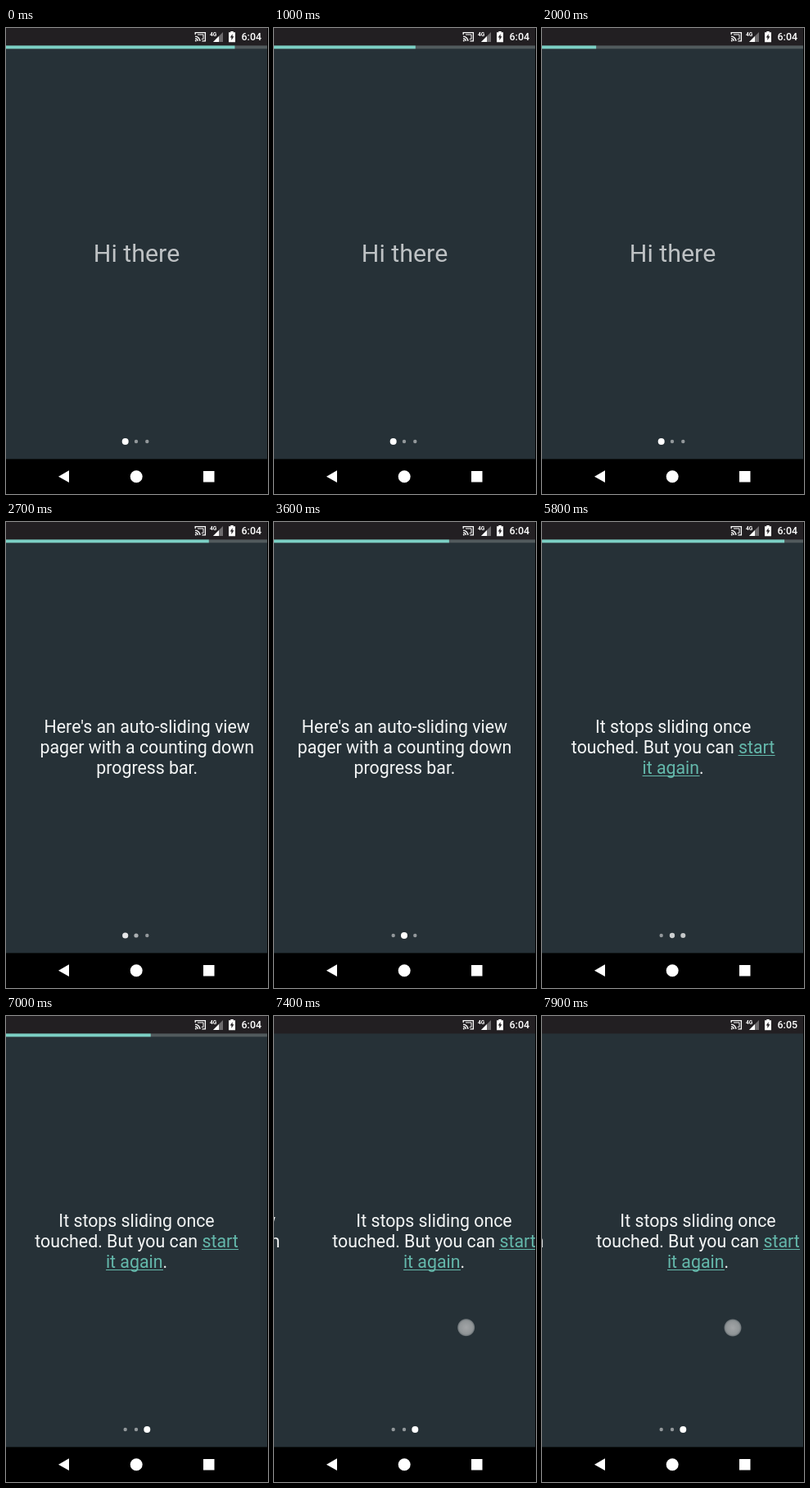
An HTML page for the animation above (8000 ms loop, 320 by 568 pixels).

```html
<!DOCTYPE html>
<html lang="en">
<head>
<meta charset="utf-8">
<title>Auto-sliding pager</title>
<style>
  html, body { margin: 0; width: 100%; height: 100%; overflow: hidden; background: #000; }
  svg { display: block; width: 320px; height: 568px; font-family: Roboto, sans-serif; }
  #pages text { text-anchor: middle; font-size: 21.33px; fill: #f4f6f6; }
  #pages .hello { font-size: 30.4px; fill: #bec2c4; }
  #pages .link { fill: #64b8ab; }
  .underline { stroke: #64b8ab; stroke-width: 1; }
</style>
</head>
<body>
<svg viewBox="0 0 320 568">
  <defs>
    <clipPath id="screen"><rect width="319" height="568"/></clipPath>
    <radialGradient id="tap">
      <stop offset="0" stop-color="#a2a5a7"/>
      <stop offset=".75" stop-color="#8f9496"/>
      <stop offset=".9" stop-color="#868c8f" stop-opacity=".8"/>
      <stop offset="1" stop-color="#7b8285" stop-opacity="0"/>
    </radialGradient>
  </defs>
  <g clip-path="url(#screen)">
    <rect width="319" height="568" fill="#263137"/>

    <g id="pages">
      <text class="hello" x="159.5" y="284.8">Hi there</text>
      <g transform="translate(319)">
        <text x="159.5" y="256.8">Here's an auto-sliding view</text>
        <text x="159.5" y="281.8">pager with a counting down</text>
        <text x="159.5" y="306.8">progress bar.</text>
      </g>
      <g transform="translate(638)">
        <text x="159.5" y="256.8">It stops sliding once</text>
        <text x="159.5" y="281.8">touched. But you can <tspan class="link">start</tspan></text>
        <text x="159.5" y="306.8"><tspan class="link">it again</tspan>.</text>
        <path class="underline" d="M239 284.5h45M122 309.5h70"/>
      </g>
    </g>

    <g id="dots" fill="#fff">
      <circle cx="145.7" cy="504"/>
      <circle cx="159" cy="504"/>
      <circle cx="172.3" cy="504"/>
    </g>

    <g id="bar">
      <rect y="21" width="319" height="4.3" fill="#515a5d"/>
      <rect id="left" y="21" height="4.3" fill="#7bcfc4"/>
    </g>
    <circle id="finger" r="11" fill="url(#tap)"/>

    <rect width="319" height="21.4" fill="#221f22"/>
    <g fill="none" stroke="#fff" stroke-width="1.3">
      <path d="M231.2 8V5.7h12.2v10.2h-4M231 10.2a5.9 5.9 0 0 1 5.9 5.9M231 12.8a3.3 3.3 0 0 1 3.3 3.3"/>
      <path d="M234 8h7v5.5h-2.2" stroke-width="1"/>
    </g>
    <circle cx="231.8" cy="15.4" r="1" fill="#fff"/>
    <text x="249" y="9.8" font-size="6.6" font-weight="700" fill="#fff">4G</text>
    <path d="M265 5v12h-12z" fill="#6d6b6d"/>
    <path d="M260 10v7h-7z" fill="#fff"/>
    <path d="M274.3 4h3.4v1.3h2.3v11.9h-8V5.300h2.300z" fill="#fff"/>
    <path d="M276.600 7.300v3h1.700l-2.900 4.700v-3.500h-1.600z" fill="#221f22"/>
    <text id="clock" x="312" y="15.4" font-size="12.400" font-weight="500" text-anchor="end" fill="#fff">6:04</text>

    <rect y="525.4" width="319" height="43"/>
    <g fill="#fff">
      <path d="M64 546.700l13-7.400v14.800z"/>
      <circle cx="159.200" cy="546.700" r="7.500"/>
      <rect x="241" y="540" width="13.500" height="13.500"/>
    </g>
  </g>
</svg>
<script>
  const $ = id => document.getElementById(id);
  const LOOP = 8000, STEP = 100, WIDTH = 319, COUNTDOWN = 3000;
  const TOUCH = 7150, MINUTE = 7800;
  const starts = [-380, 2605, 5657];   // when each page begins its countdown

  const clamp = v => Math.min(1, Math.max(0, v));
  const progress = (t, start, length) => clamp((t - start) / length);
  const decelerate = (u, power) => 1 - (1 - u) ** power;
  const easeInOut = u => (1 - Math.cos(Math.PI * u)) / 2;

  // Linear interpolation through [time, value] points.
  function follow(t, points) {
    let [t0, v0] = points[0];
    for (const [t1, v1] of points) {
      if (t < t1) return t1 === t0 ? v0 : v0 + (v1 - v0) * progress(t, t0, t1 - t0);
      [t0, v0] = [t1, v1];
    }
    return v0;
  }

  function drawPages(t) {
    const position = [1, 2].reduce((sum, i) => sum + decelerate(progress(t, starts[i], 200), 5), 0);
    const drag = follow(t, [[7220, 0], [7500, 56], [7700, 56], [7900, 31]]);
    $('pages').setAttribute('transform', `translate(${drag - position * WIDTH})`);
  }

  function drawDots(t) {
    const shown = i => i < starts.length ? easeInOut(progress(t, starts[i], 300)) : 0;
    [...$('dots').children].forEach((dot, i) => {
      const active = shown(i) - shown(i + 1);
      dot.setAttribute('r', 2.2 + 1.8 * active);
      dot.setAttribute('opacity', 0.5 + 0.5 * active);
    });
  }

  function drawBar(t) {
    const start = starts.filter(s => s <= t).pop();
    const refill = decelerate(progress(t, start, 172), 2);
    $('left').setAttribute('width', 320 * (1 - progress(t, start, COUNTDOWN)) * refill);
    $('bar').style.display = t < TOUCH ? '' : 'none';
  }

  function drawFinger(t) {
    const x = follow(t, [[7200, 188], [7500, 258], [7700, 258], [7900, 233]]);
    const y = follow(t, [[7200, 376], [7500, 381.5], [7700, 381.5], [7900, 380]]);
    $('finger').setAttribute('transform', `translate(${x} ${y})`);
    $('finger').style.display = t < TOUCH ? 'none' : '';
  }

  function draw() {
    // The small lead keeps a step from being missed by rounding.
    const t = Math.floor((performance.now() + 5) / STEP) * STEP % LOOP;
    drawPages(t);
    drawDots(t);
    drawBar(t);
    drawFinger(t);
    $('clock').textContent = t < MINUTE ? '6:04' : '6:05';
    requestAnimationFrame(draw);
  }
  draw();
</script>
</body>
</html>
```
